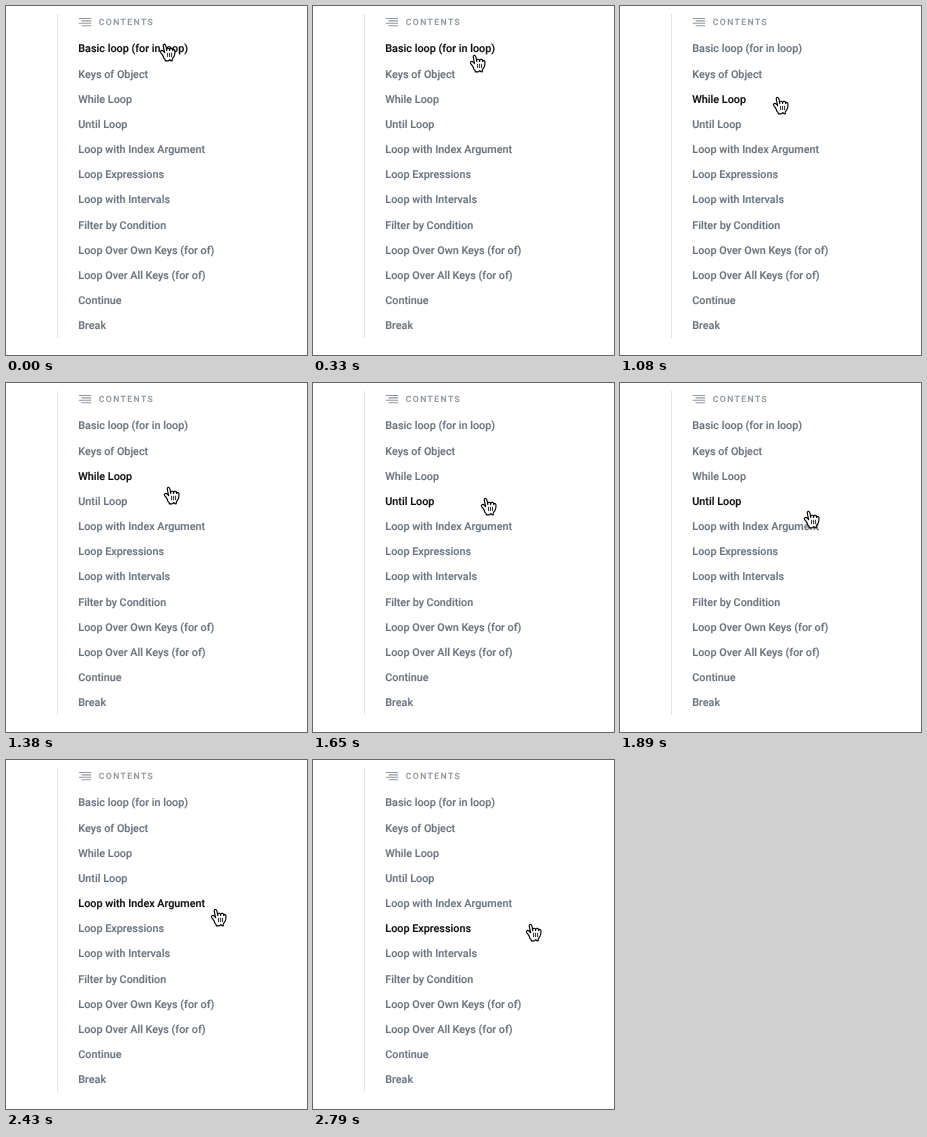
These frames come from a looping animation (301 px wide and 349 px high, 2820 ms). An HTML page:

```html
<!DOCTYPE html>
<html lang="en">
<head>
<meta charset="utf-8">
<title>Contents</title>
<style>
  html, body { margin: 0; width: 100%; height: 100%; overflow: hidden; background: #fff; }
  svg { display: block; width: 301px; height: 349px; }
  text {
    font-family: Roboto, Arial, sans-serif; font-weight: 500; text-rendering: geometricPrecision;
    fill: currentColor; stroke: currentColor; stroke-width: .15px;
  }
  .heading { font-size: 8.6px; letter-spacing: 1.42px; color: #8f979f; }
  .link { font-size: 10.8px; color: #6a747e; }
  .link.active { color: #0c0e10; }
</style>
</head>
<body>
<svg viewBox="0 0 301 349">
  <rect width="301" height="349" fill="#fff"/>
  <rect x="51" y="8" width="1" height="324" fill="#e2e5e8"/>
  <path d="M73.3 12.5H84.7M76 14.9H84.7M73.3 17.3H84.7M76 19.7H84.7"
    stroke="#8f979f" stroke-width="1.1" stroke-linecap="round"/>
  <text class="heading" x="92.8" y="19">CONTENTS</text>
  <g id="links"></g>
  <g id="cursor" stroke="#000" stroke-width="1.15" stroke-linejoin="round" stroke-linecap="round">
    <path fill="#fff" d="M11.3 20.4c-.3-.4-.6-1.1-1.2-2-.3-.5-1.2-1.5-1.5-1.9-.2-.4-.2-.6-.1-1 .1-.6.7-1.1 1.4-1.1.5 0 1 .4 1.4.7.2.2.5.6.7.8.2.2.2.3.4.5.2.3.3.5.2.1-.1-.5-.2-1.3-.4-2.1-.1-.6-.2-.7-.3-1.1-.1-.5-.2-.8-.3-1.3-.1-.3-.2-1.1-.3-1.5-.1-.5-.1-1.4.3-1.8.3-.3.9-.4 1.3-.2.5.3.8 1 .9 1.3.2.5.4 1.2.5 2 .2 1 .5 2.5.5 2.8 0-.4-.1-1.1 0-1.5.1-.3.3-.7.7-.8.3-.1.6-.1.9-.1.3.1.6.3.8.5.4.6.4 1.9.4 1.8.1-.4.1-1.2.3-1.6.1-.2.5-.4.7-.5.3-.1.7-.1 1 0 .2 0 .6.3.7.5.2.3.3 1.3.4 1.7 0 .1.1-.4.3-.7.4-.6 1.8-.8 1.9.6v1.9c0 .5 0 .8-.1 1.6-.1.5-.3 1.3-.5 1.7-.1.4-.5 1-.8 1.5 0 0-1.1 1.2-1.2 1.8-.1.5-.1.6-.1 1 0 .4.1.8.1.8s-.8.1-1.2 0c-.4-.1-.9-.8-1-1.1-.2-.3-.5-.3-.7 0-.2.4-.7 1.1-1.1 1.1-.7.1-2 0-3.1 0 0 0 .2-1-.2-1.4-.3-.3-.8-.8-1.1-1.1z"/>
    <path fill="none" stroke-width=".85" d="M15.6 17.2v3.5M17.6 17.2v3.5M19.6 17.2v3.5"/>
  </g>
</svg>
<script>
const LOOP = 2820, TICK = 30, PITCH = 25.17;
const labels = ['Basic loop (for in loop)', 'Keys of Object', 'While Loop', 'Until Loop',
  'Loop with Index Argument', 'Loop Expressions', 'Loop with Intervals', 'Filter by Condition',
  'Loop Over Own Keys (for of)', 'Loop Over All Keys (for of)', 'Continue', 'Break'];

// Fingertip path: time, x, y
const path = [[0, 158, 38], [660, 163, 69], [1080, 157, 91], [1650, 172, 115],
  [2100, 201, 138], [2430, 209, 149], [2700, 217, 164], [2820, 217, 164]];

const group = document.getElementById('links');
const cursor = document.getElementById('cursor');
const links = labels.map((label, i) => {
  const link = document.createElementNS('http://www.w3.org/2000/svg', 'text');
  link.setAttribute('x', 72.3);
  link.setAttribute('y', Math.round(46.4 + PITCH * i));
  link.textContent = label;
  return group.appendChild(link);
});

// Monotone slope at a waypoint, so the pointer never overshoots
function slope(i, axis) {
  if (i === 0 || i === path.length - 1) return 0;
  const rate = k => (path[k + 1][axis] - path[k][axis]) / (path[k + 1][0] - path[k][0]);
  const a = rate(i - 1), b = rate(i);
  return a * b > 0 ? 2 * a * b / (a + b) : 0;
}

function position(t, axis) {
  const i = Math.max(0, path.findIndex(p => p[0] > t) - 1);
  const p = path[i], q = path[i + 1], span = q[0] - p[0];
  const u = (t - p[0]) / span, v = 1 - u;
  return p[axis] * v * v * (1 + 2 * u) + q[axis] * u * u * (1 + 2 * v)
    + span * u * v * (slope(i, axis) * v - slope(i + 1, axis) * u);
}

function draw(time) {
  const t = Math.floor(time % LOOP / TICK) * TICK;
  const x = Math.round(position(t, 1)), y = Math.round(position(t, 2));
  const hovered = Math.round((y - 42.5) / PITCH);
  cursor.setAttribute('transform', `translate(${x - 12} ${y - 8})`);
  links.forEach((link, i) => link.setAttribute('class', i === hovered ? 'link active' : 'link'));
}

const start = performance.now();
function frame() {
  draw(performance.now() - start);
  requestAnimationFrame(frame);
}
frame();
</script>
</body>
</html>
```
